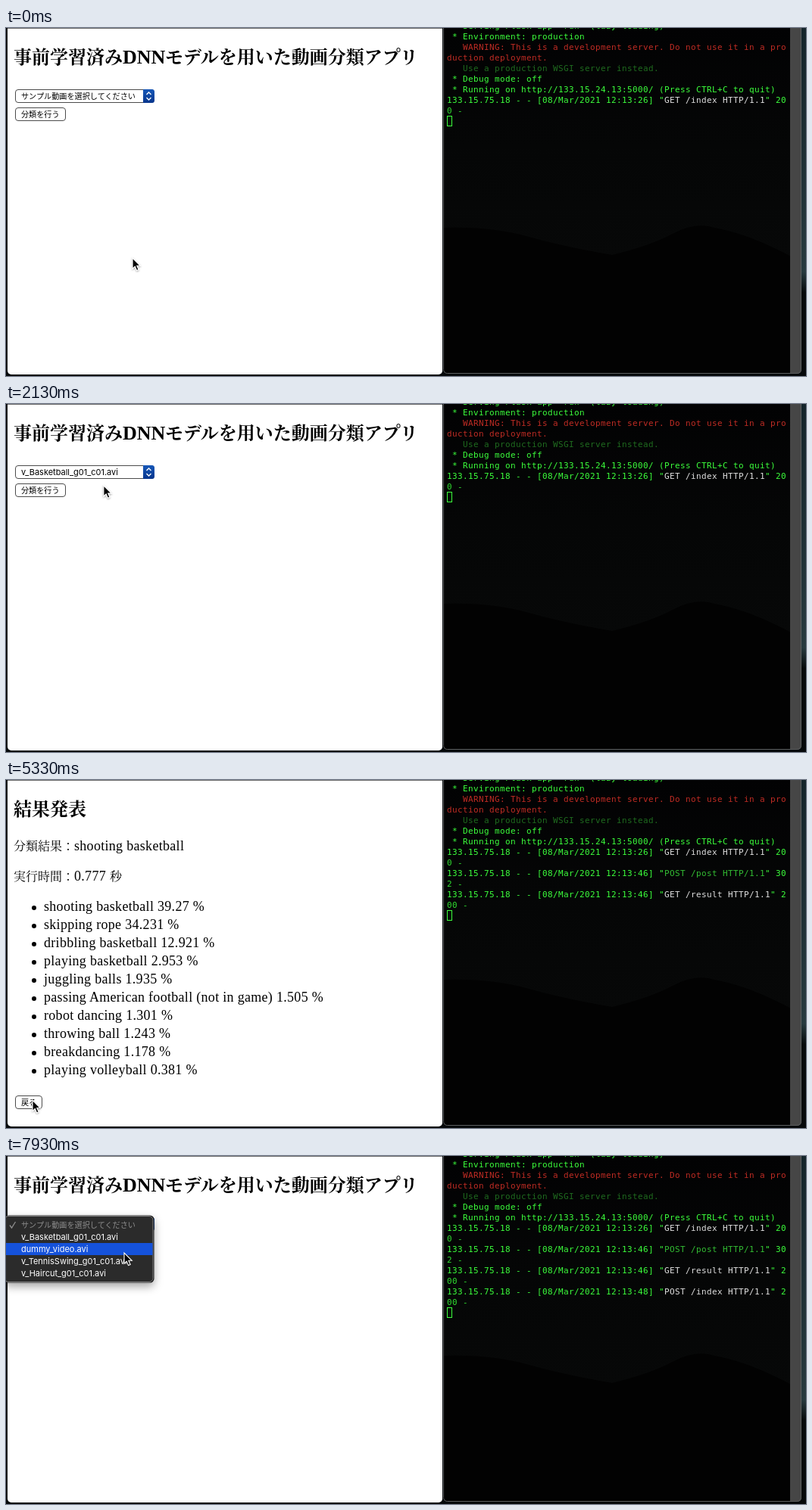
An HTML page for the animation above (8 s loop, 1056x460 px).

```html
<!DOCTYPE html>
<html lang="ja">
<head>
<meta charset="utf-8">
<style>
html, body { margin: 0; height: 100%; overflow: hidden; background: #06090b; }
svg { display: block; width: 1056px; height: 460px; }
text { white-space: pre; }
.serif { font: 18px "Liberation Serif", serif; letter-spacing: .3px; }
.title { font: bold 24px "Noto Serif CJK JP", "Noto Sans CJK JP", "Noto Sans CJK", serif; }
.latin { font: bold 26px "Liberation Serif", serif; }
.jp { font: 500 16px "Noto Serif CJK JP", "Noto Sans CJK JP", "Noto Sans CJK", serif; }
.ui { font: 11px Inter, sans-serif; }
.kana { font: 10.15px "Noto Sans CJK JP", "Noto Sans CJK", sans-serif; }
.mono { font: 11px "DejaVu Sans Mono", monospace; letter-spacing: .378px; }
</style>
</head>
<body>
<svg viewBox="0 0 1056 460">
  <defs>
    <linearGradient id="sky" x2="0" y2="1">
      <stop offset="0" stop-color="#020203"/>
      <stop offset=".5" stop-color="#050606"/>
      <stop offset="1" stop-color="#070808"/>
    </linearGradient>
    <linearGradient id="blue" x2="0" y2="1">
      <stop offset="0" stop-color="#1758b8"/>
      <stop offset="1" stop-color="#07358c"/>
    </linearGradient>
    <linearGradient id="edge" x2="0" y2="1">
      <stop offset="0" stop-color="#14242a"/>
      <stop offset=".7" stop-color="#283a3f"/>
      <stop offset=".76" stop-color="#06090b"/>
    </linearGradient>
    <filter id="shade" x="-20%" y="-20%" width="150%" height="160%">
      <feDropShadow dx="0" dy="5" stdDeviation="6" flood-opacity=".35"/>
    </filter>
    <filter id="soft" x="-50%" y="-50%" width="200%" height="200%">
      <feDropShadow dx="0" dy="1" stdDeviation="1" flood-opacity=".4"/>
    </filter>
    <clipPath id="term"><rect x="578" y="-9" width="472" height="466" rx="5"/></clipPath>
  </defs>

  <rect x="1050" width="6" height="460" fill="url(#edge)"/>
  <g clip-path="url(#term)">
    <rect x="578" width="458" height="310" fill="url(#sky)"/>
    <path d="M578 264Q640 262 690 276T800 300Q850 288 880 272T935 264Q980 272 1036 302V460H578Z" fill="#020202"/>
    <rect x="1035" width="15" height="460" fill="#464646"/>
  </g>
  <rect x="577.5" y="-9" width="472" height="465.5" rx="5" fill="none" stroke="#5d5f60"/>
  <g id="console" class="mono"></g>

  <rect x="2" y="-9" width="574" height="467" rx="5" fill="#fff"/>
  <path d="M2 .5H576" stroke="#6c6c6c"/>
  <g id="form"></g>
  <g id="result"></g>
  <g id="menu"></g>
  <path id="cursor" d="M0 0V14.2L3.3 11.2 5.6 16.6 8.1 15.5 5.8 10.3H10.2Z" stroke="#fff" stroke-width="1.1" filter="url(#soft)"/>
</svg>
<script>
const $ = id => document.getElementById(id);
const text = (x, y, cls, s, fill = '#000') => `<text x="${x}" y="${y}" class="${cls}" fill="${fill}">${s}</text>`;
const span = (s, fill) => `<tspan fill="${fill}">${s}</tspan>`;
const box = (x, y, w, h) => `<rect x="${x}.5" y="${y}.5" width="${w}" height="${h}" rx="3.5" fill="#fff" stroke="#4c4c4c"/>`;
const show = (id, on) => $(id).setAttribute('visibility', on ? 'visible' : 'hidden');

// Terminal
const GREEN = '#3cff3c', DIM = '#30dc30', RED = '#c02c24', WHITE = '#e0e0e0';
const line = (row, s, fill = GREEN) => text(582, 1 + row * 14, '', s, fill);
function entry(row, time, request, status, fill, id) {
  const head = `133.15.75.18 - - [08/Mar/2021 12:13:${time}] "`;
  const room = 63 - head.length - request.length;
  const tail = ` ${status} -`;
  return `<g id="${id}">` +
    line(row, head + span(request, fill) + '"' + tail.slice(0, room)) +
    line(row + 1, tail.slice(room), DIM) + '</g>';
}
$('console').innerHTML =
  line(0, ' * Serving Flask app "run" (lazy loading)') +
  line(1, ' * Environment: production') +
  line(2, '   WARNING: This is a development server. Do not use it in a pro', RED) +
  line(3, 'duction deployment.', RED) +
  line(4, '   Use a production WSGI server instead.', '#1f6b1f') +
  line(5, ' * Debug mode: off') +
  line(6, ' * Running on http://133.15.24.13:5000/ (Press CTRL+C to quit)') +
  entry(7, 26, 'GET /index HTTP/1.1', 200, WHITE, 'log0') +
  entry(9, 46, 'POST /post HTTP/1.1', 302, '#33bd33', 'log1') +
  entry(11, 46, 'GET /result HTTP/1.1', 200, WHITE, 'log2') +
  entry(13, 48, 'POST /index HTTP/1.1', 200, WHITE, 'log3') +
  `<rect id="caret" x="582.5" width="6" height="13" fill="none" stroke="${GREEN}"/>`;

// Form page
const PROMPT = 'サンプル動画を選択してください';
const FILES = ['v_Basketball_g01_c01.avi', 'dummy_video.avi', 'v_TennisSwing_g01_c01.avi', 'v_Haircut_g01_c01.avi'];
$('form').innerHTML =
  text(10, 47, 'title', '事前学習済み') + text(154, 47, 'latin', 'DNN') +
  text(210, 47, 'title', 'モデルを用いた動画分類アプリ') +
  box(12, 81, 183, 17) +
  '<path d="M181 81H192.5Q196 81 196 84.5V95.5Q196 99 192.5 99H181Z" fill="url(#blue)"/>' +
  '<path d="M185.5 88L188.5 85 191.5 88M185.5 92L188.5 95 191.5 92" fill="none" stroke="#fff" stroke-width="1.3"/>' +
  `<g id="prompt">${text(20, 94, 'kana', PROMPT)}</g><g id="picked">${text(20, 94, 'ui', FILES[0])}</g>` +
  box(12, 105, 66, 17) + text(20, 118, 'kana', '分類を行う');

// Result page
const SCORES = ['shooting basketball 39.27', 'skipping rope 34.231', 'dribbling basketball 12.921',
  'playing basketball 2.953', 'juggling balls 1.935', 'passing American football (not in game) 1.505',
  'robot dancing 1.301', 'throwing ball 1.243', 'breakdancing 1.178', 'playing volleyball 0.381'];
$('result').innerHTML =
  text(10, 47, 'title', '結果発表') +
  text(10, 93, 'jp', '分類結果：') + text(90, 93, 'serif', 'shooting basketball') +
  text(10, 133, 'jp', '実行時間：') + text(90, 133, 'serif', '0.777') + text(137, 133, 'jp', '秒') +
  SCORES.map((s, i) => `<circle cx="37" cy="${169 + i * 24}" r="3"/>` + text(50, 173 + i * 24, 'serif', s + ' %')).join('') +
  box(12, 417, 35, 17) + text(20, 430, 'kana', '戻る');

// Dropdown
$('menu').innerHTML =
  '<rect x="-2" y="78.5" width="197.5" height="89" rx="5.5" fill="#111" filter="url(#shade)"/>' +
  '<rect x="-2" y="79.5" width="196" height="87" rx="5" fill="#2b2b2b" stroke="#858585"/>' +
  '<rect id="bar" width="193.5" height="16" fill="#1552db"/>' +
  '<path d="M5 91.5L7.5 95 12.5 87" fill="none" stroke="#8d8d8d" stroke-width="1.3"/>' +
  text(20, 94.5, 'kana', PROMPT, '#8d8d8d') +
  FILES.map((s, i) => text(20, 111 + i * 16, 'ui', s, '#fff')).join('');

// Pointer: time, x, y
const PATH = [[0, 167, 304], [200, 140, 262], [450, 124, 190], [700, 150, 115], [867, 172, 87], [1200, 172, 87],
  [1500, 165, 97], [1800, 160, 102], [2000, 160, 102], [2300, 90, 115], [2540, 52, 113], [2670, 52, 113],
  [2900, 170, 140], [3130, 243, 158], [3990, 243, 158], [4200, 215, 212], [4500, 170, 270], [4800, 115, 313],
  [5200, 45, 418], [5400, 30, 426], [5670, 30, 426], [6860, 80, 356], [7150, 140, 210], [7350, 178, 92],
  [7670, 182, 90], [7933, 156, 128], [8000, 156, 128]];
function pointer(t) {
  const i = Math.max(1, PATH.findIndex(p => p[0] >= t));
  const [t0, x0, y0] = PATH[i - 1], [t1, x1, y1] = PATH[i];
  const k = (t - t0) / (t1 - t0);
  return [x0 + (x1 - x0) * k, y0 + (y1 - y0) * k];
}

function draw(now) {
  const step = 1000 / 15;
  const t = Math.floor((now % 8000 + 4) / step) * step % 8000;
  const [x, y] = pointer(t);
  const result = t >= 3590 && t < 5650;
  const picked = t >= 2060 && t < 3590;
  const open = t >= 1100 && t < 2060 || t >= 7530;
  const row = Math.floor((y - 99) / 16);
  const logs = t < 3590 ? 1 : t < 5720 ? 3 : 4;

  show('result', result);
  show('form', !result);
  show('prompt', !result && !picked);
  show('picked', picked);
  show('menu', open);
  show('bar', open && row >= 0);
  $('bar').setAttribute('y', 99 + row * 16);
  for (let i = 0; i < 4; i++) show('log' + i, i < logs);
  $('caret').setAttribute('y', 88.5 + logs * 28);
  show('cursor', t < 5650 || t >= 6860);
  $('cursor').setAttribute('transform', `translate(${x} ${y})`);
}

const start = performance.now();
function tick() {
  draw(performance.now() - start);
  requestAnimationFrame(tick);
}
tick();
</script>
</body>
</html>
```
